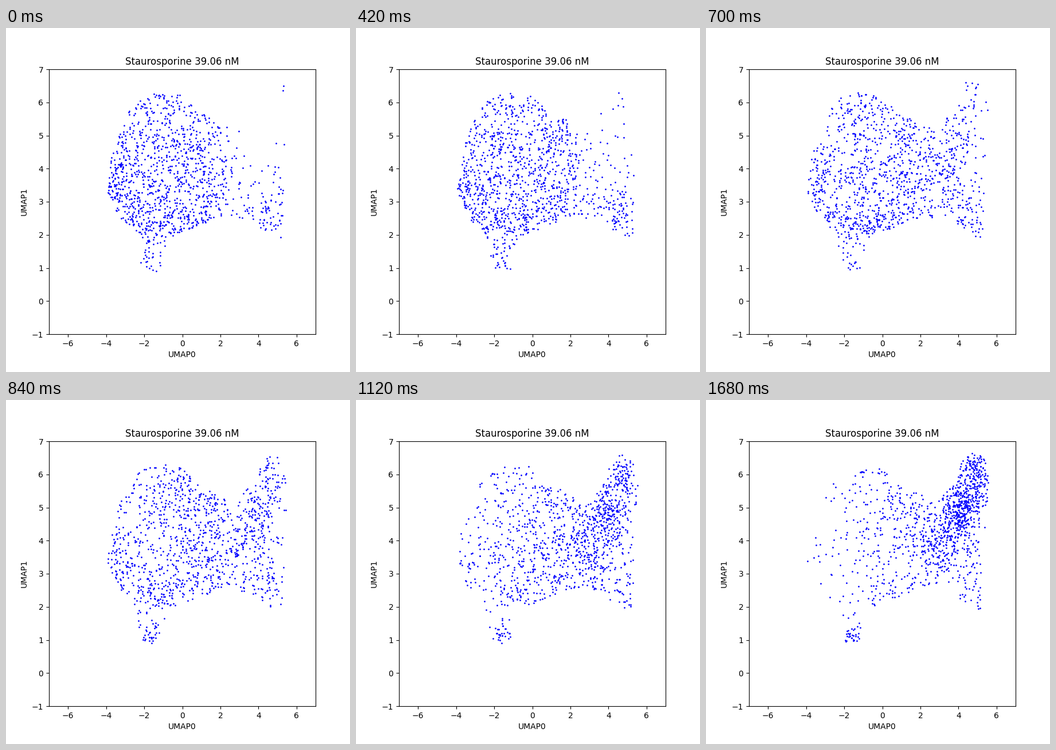
These frames come from a looping animation (600 px wide and 600 px high, 1820 ms). A matplotlib script:

```python
import numpy as np
import matplotlib.pyplot as plt
from matplotlib.animation import FuncAnimation
from matplotlib.path import Path

FRAMES, STEP = 13, 140
CELLS, POOL = 1180, 40000

# Edge of the cell map: round body, upper horn, lower horn, small tail
EDGE = Path([(-3.95, 3.3), (-3.75, 4.3), (-3.3, 5.15), (-2.8, 5.75), (-2.2, 6.15),
             (-1.2, 6.3), (-0.2, 6.27), (0.8, 5.75), (1.7, 5.5), (2.8, 5.1),
             (3.3, 5.5), (3.9, 5.9), (4.15, 6.75), (5.3, 6.55), (5.6, 5.9),
             (5.35, 4.0), (5.25, 1.9), (4.9, 1.9), (3.5, 2.45), (2.0, 2.55),
             (0.3, 2.15), (-0.8, 1.9), (-1.2, 0.9), (-1.6, 0.9), (-2.15, 1.0),
             (-2.5, 2.05), (-3.3, 2.5)])


def smooth(t):
    return t * t * (3 - 2 * t)


def bump(x, y, cx, cy, sx, sy):
    return np.exp(-((x - cx) / sx)**2 / 2 - ((y - cy) / sy)**2 / 2)


def density(x, y, s):
    """Relative cell density; s goes from 0 (body) to 1 (horn)."""
    right = 1 / (1 + np.exp((2.2 - x) / 0.25))
    body = np.exp(-s * (0.9 - 0.35 * x)) * np.where(y < 2.05, 0.5, 1)
    body += 2.2 * (1 - s)**2 * bump(x, y, -3.4, 3.2, 0.4, 0.6)
    body += (1 - s) * bump(x, y, -0.8, 2.4, 1.4, 0.35)
    fringe = 0.35 * np.exp(-1.3 * (1 - s) * np.maximum(y - 3, 0))
    tip = (1 - 0.7 * s) * bump(x, y, 4.7, 2.5, 0.4, 0.4)
    bridge = 1.6 * s * bump(x, y, 3.0, 3.9, 0.65, 0.6)
    horn = bump(x, y, 4.05, 4.85, 0.5, 0.45)
    horn += bump(x, y, 4.4 + 0.5 * s, 6.0, 0.33, 0.4)
    tail = (0.5 + 2 * s) * bump(x, y, -1.6, 1.1, 0.25, 0.2)
    return (1 - right) * body + right * (fringe + tip) + bridge + 5.5 * s**2 * horn + tail


def cells(i):
    rng = np.random.default_rng(390 + i)
    pts = rng.uniform((-4, 0.85), (5.65, 6.8), (POOL, 2))
    pts = pts[EDGE.contains_points(pts)]
    w = density(*pts.T, smooth(i / (FRAMES - 1)))
    return rng.choice(pts, CELLS, replace=False, p=w / w.sum())


fig, ax = plt.subplots(figsize=(6, 6), dpi=100)
ax.set(xlim=(-7, 7), ylim=(-1, 7), xlabel="UMAP0", ylabel="UMAP1",
       title="Staurosporine 39.06 nM")
dots, = ax.plot([], [], "b.", markersize=2)


def update(i):
    dots.set_data(*cells(i).T)
    return dots,


anim = FuncAnimation(fig, update, frames=FRAMES, interval=STEP,
                     init_func=lambda: update(0), repeat=True, repeat_delay=0)
plt.show()
```
